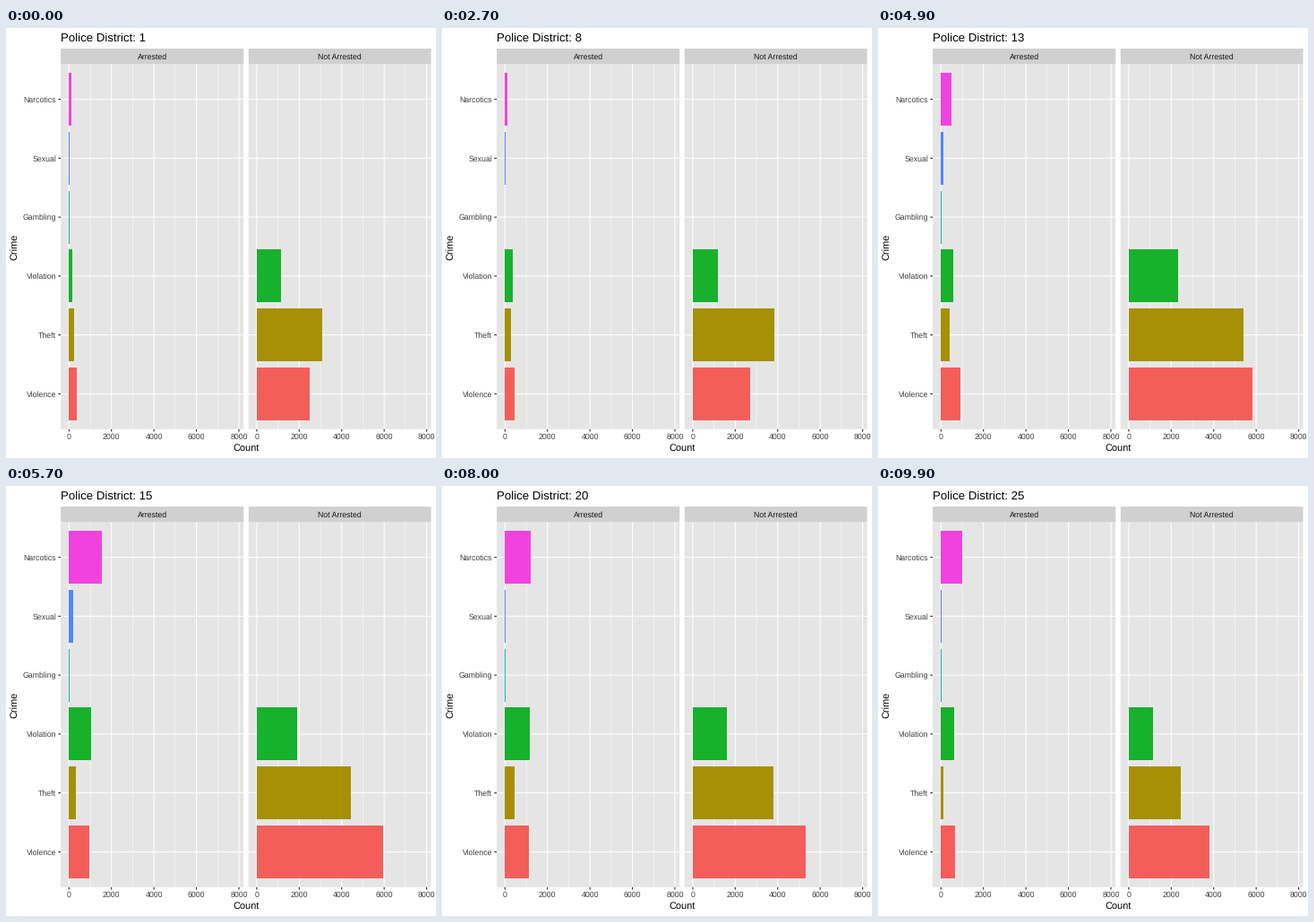
Recreate the animation shown at these times as a matplotlib script. Size 480 by 480 pixels, loop 10 s.

```python
import matplotlib.pyplot as plt
import numpy as np
from matplotlib.animation import FuncAnimation
from matplotlib.patches import Rectangle

SIZE, DPI = 480, 72
FRAMES, STEP = 100, 100
DISTRICTS = 25

CRIMES = ["Violence", "Theft", "Violation", "Gambling", "Sexual", "Narcotics"]
COLORS = ["#f35e5a", "#a69006", "#17b12b", "#18b5ba", "#5086ff", "#f043de"]
TOP, BOTTOM = 40.2, 447.8
ROW = (BOTTOM - TOP) / 6.2
UNIT = 189.68 / 8000  # pixels per count
# label, panel left edge, panel right edge, x of zero
PANELS = [("Arrested", 61.1, 265.2, 70.3), ("Not Arrested", 270.8, 474.5, 279.9)]

# Typical counts for a span of districts: arrested per crime, then the
# first three crimes without arrest. Between spans the counts drift linearly.
PROFILES = {
    (1, 1): (370, 240, 150, 10, 20, 110, 2500, 3090, 1150),
    (7, 8): (450, 290, 370, 10, 20, 110, 2700, 3850, 1190),
    (13, 13): (910, 410, 580, 10, 110, 490, 5830, 5370, 2330),
    (16, 17): (1010, 240, 1420, 10, 240, 2390, 6000, 3640, 1520),
    (20, 21): (1130, 450, 1160, 10, 20, 1210, 5320, 3800, 1600),
    (25, 25): (670, 120, 630, 10, 20, 1000, 3800, 2450, 1150),
}
QUIET, QUIET_COUNTS = 4, (5, 0, 0, 0, 0, 5, 17, 16, 13)
# Districts that stand above or below the drift
SCALE = {5: 1.57, 7: 0.88, 8: 1.12, 11: 0.9, 12: 0.7, 13: 1.09, 14: 1.33,
         15: 0.9, 16: 1.2, 17: 0.8, 20: 0.62, 21: 1.38, 23: 1.4}
NO_GAMBLING = (7, 22)


def build_states():
    """Counts per district and bar; zero means no bar."""
    ids = np.arange(1, DISTRICTS + 1)
    knots = np.ravel(list(PROFILES))
    rows = np.repeat(np.array(list(PROFILES.values()), float), 2, axis=0)
    states = np.column_stack([np.interp(ids, knots, col) for col in rows.T])
    states *= np.array([SCALE.get(d, 1) for d in ids])[:, None]
    states[QUIET - 1] = QUIET_COUNTS
    states[np.isin(ids, NO_GAMBLING), CRIMES.index("Gambling")] = 0
    return states


STATES = build_states()
KEYS = [round(k * (FRAMES - 1) / (DISTRICTS - 1)) for k in range(DISTRICTS)]


def counts_at(frame):
    i = int(np.searchsorted(KEYS, frame, side="right")) - 1
    if i >= DISTRICTS - 1:
        return STATES[-1]
    a, b = STATES[i], STATES[i + 1]
    t = (frame - KEYS[i]) / (KEYS[i + 1] - KEYS[i])
    # a bar missing from the next district stays until that district is reached
    return np.where((a > 0) & (b > 0), a + (b - a) * t, a)


plt.rcParams["font.family"] = "Liberation Sans"
plt.rcParams["text.hinting"] = "none"
fig = plt.figure(figsize=(SIZE / DPI, SIZE / DPI), dpi=DPI, facecolor="white")
ax = fig.add_axes([0, 0, 1, 1])
ax.set(xlim=(0, SIZE), ylim=(SIZE, 0))
ax.axis("off")


def box(x, y, w, h, color, z):
    rect = Rectangle((x, y), w, h, fc=color, lw=0, zorder=z, snap=False)
    return ax.add_patch(rect)


def line(xs, ys, width, color="white"):
    ax.plot(xs, ys, color=color, lw=width, zorder=2, solid_capstyle="butt", snap=False)


def label(x, y, text, size, color="black", ha="center", **kw):
    return ax.text(x, y, text, fontsize=size, color=color, ha=ha, va="baseline", **kw)


def row_y(crime):
    return BOTTOM - ROW * (0.6 + crime)


bars = []  # (patch, x of zero, thinnest width)
for name, left, right, zero in PANELS:
    arrested = name == "Arrested"
    box(left, TOP, right - left, BOTTOM - TOP, "#e5e5e5", 1)
    box(left, 23, right - left, TOP - 23, "#d0d0d0", 1)
    label((left + right) / 2, 35, name, 8.8, "#141414")
    for count in range(0, 8001, 1000):
        x = zero + count * UNIT
        major = count % 2000 == 0
        line([x, x], [TOP, BOTTOM], 1.07 if major else 0.53)
        if major:
            line([x, x], [BOTTOM, BOTTOM + 2.75], 1.07, "#272727")
            label(x, 459.2, str(count), 8.8, "#404040")
    for crime, color in enumerate(COLORS):
        y = row_y(crime)
        line([left, right], [y, y], 1.07)
        if arrested or crime < 3:
            y0, y1 = round(y - 0.45 * ROW), round(y + 0.45 * ROW)
            bar = box(round(zero), y0, 0, y1 - y0, color, 3)
            bars.append((bar, zero, 1 if arrested else 0.3))

for crime, name in enumerate(CRIMES):
    y = row_y(crime)
    line([58.35, 61.1], [y, y], 1.07, "#272727")
    label(56, y + 3.4, name, 8.8, "#404040", "right")

label(267.7, 472, "Count", 11)
label(13.3, 244.8, "Crime", 11, rotation=90, rotation_mode="anchor")
title = label(61, 15, "", 13.2, ha="left")


def update(frame):
    district = round(1 + frame * (DISTRICTS - 1) / (FRAMES - 1))
    title.set_text(f"Police District: {district}")
    for (bar, zero, thinnest), count in zip(bars, counts_at(frame)):
        edge = round(zero + count * UNIT)
        bar.set_width(max(thinnest, edge - round(zero)))
        bar.set_visible(count > 0)
    return [title] + [bar for bar, *_ in bars]


anim = FuncAnimation(fig, update, frames=FRAMES, interval=STEP, repeat=True,
                     repeat_delay=0, blit=False)
plt.show()
```
